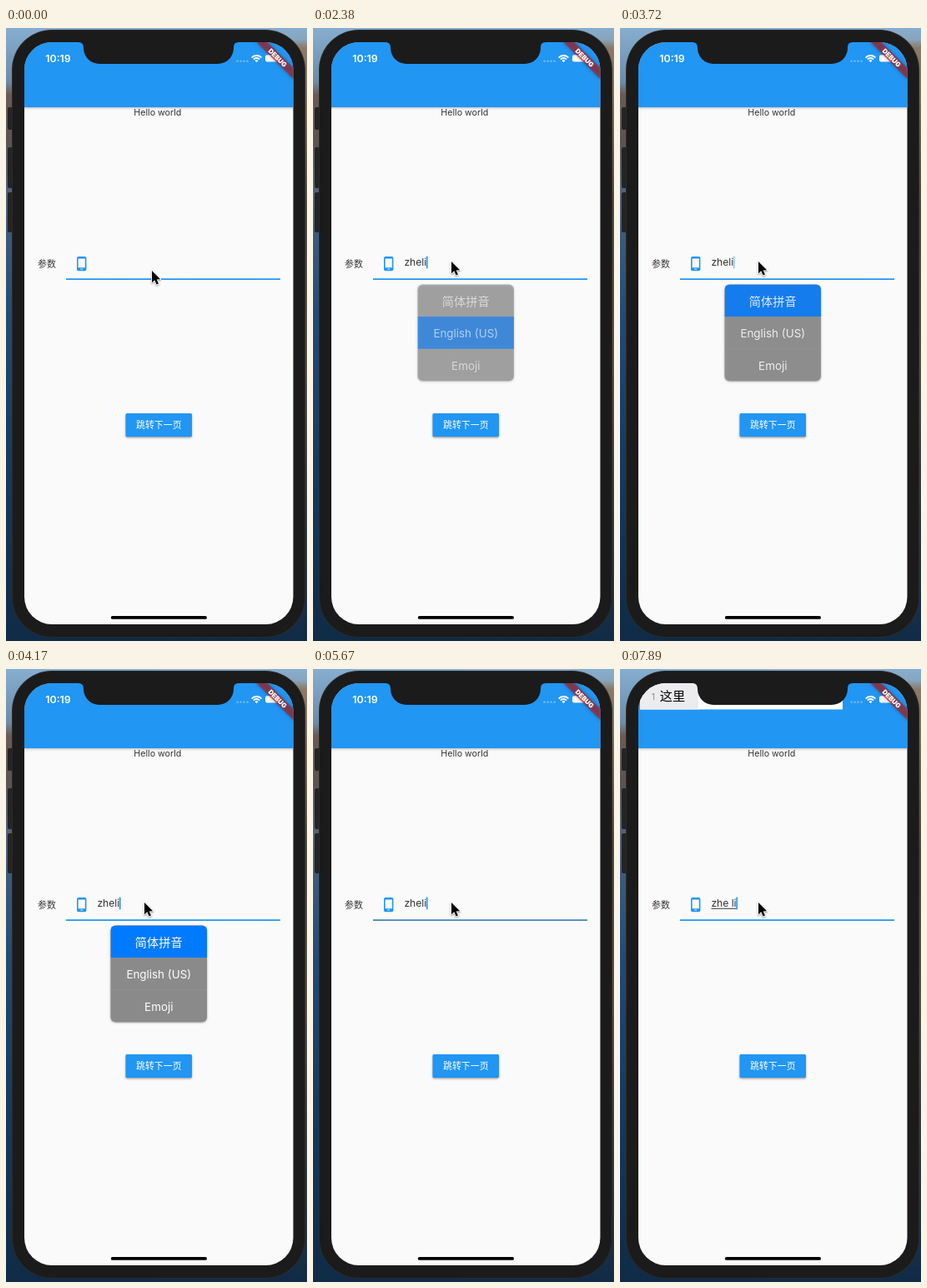
Recreate the animation shown at these times as an HTML page with a canvas. Size 361 px wide and 735 px high, loop 8000 ms.

```html
<!DOCTYPE html>
<html lang="zh-CN">
<head>
<meta charset="utf-8">
<title>Text field demo</title>
<style>
  html, body { margin: 0; width: 100%; height: 100%; overflow: hidden; background: #12304f; }
  canvas { display: block; width: 361px; height: 735px; }
</style>
</head>
<body>
<canvas id="stage"></canvas>
<script>
const W = 361, H = 735, LOOP = 8000;
const BLUE = '#2196f3', INK = '#333333';
const LATIN = 'Inter, "Noto Sans CJK SC", sans-serif';
const HAN = '"Noto Sans CJK SC", "Noto Sans CJK", sans-serif';

const canvas = document.getElementById('stage');
const ctx = canvas.getContext('2d');
const dpr = window.devicePixelRatio || 1;
canvas.width = W * dpr;
canvas.height = H * dpr;

// Each entry changes some of the state from its time (ms) on.
const START = {
  text: '', caret: 0, mx: 175, my: 291, line: BLUE,
  pick: 1, menu: 0, bar: '', composing: false
};
const STEPS = [
  [150, { mx: 169, my: 284, caret: 0.5 }],
  [300, { mx: 166, my: 280, caret: 1 }],
  [600, { caret: 0.5 }],
  [740, { caret: 0 }],
  [1040, { caret: 0.3 }],
  [1190, { caret: 0.7 }],
  [1340, { caret: 1 }],
  [1640, { caret: 0.5 }],
  [1790, { caret: 0 }],
  [2080, { text: 'zh', caret: 1 }],
  [2230, { text: 'zhel' }],
  [2380, { text: 'zheli', menu: 0.6 }],
  [2530, { menu: 1 }],
  [3280, { caret: 0.4 }],
  [3430, { caret: 0, menu: 0.86 }],
  [3580, { menu: 0.6 }],
  [3720, { pick: 0, menu: 0.85, caret: 0.5 }],
  [3870, { menu: 1, caret: 1 }],
  [4320, { menu: 0.4, line: '#3a8ed6' }],
  [4470, { menu: 0, line: '#4585bd' }],
  [5820, { line: BLUE }],
  [5970, { text: 'zhel' }],
  [6110, { text: 'zhe' }],
  [6260, { text: 'zh' }],
  [6410, { text: 'z' }],
  [6550, { text: '' }],
  [6850, { text: 'z', bar: '在', composing: true }],
  [7000, { text: 'zh', bar: '这' }],
  [7590, { text: 'zhe' }],
  [7740, { text: 'zhe l', bar: '这里' }],
  [7890, { text: 'zhe li' }]
];

function stateAt(t) {
  const s = { ...START };
  for (const [time, change] of STEPS) if (t >= time) Object.assign(s, change);
  return s;
}

function box(x, y, w, h, color, r = 0) {
  ctx.fillStyle = color;
  ctx.beginPath();
  ctx.roundRect(x, y, w, h, r);
  ctx.fill();
}

function shadow(color, blur, dy) {
  ctx.shadowColor = color;
  ctx.shadowBlur = blur * dpr;
  ctx.shadowOffsetY = dy * dpr;
}

function label(text, x, y, font, color, align = 'left') {
  ctx.font = font;
  ctx.fillStyle = color;
  ctx.textAlign = align;
  ctx.textBaseline = 'alphabetic';
  ctx.fillText(text, x, y);
}

function vertical(x, w, stops) {
  const g = ctx.createLinearGradient(0, 0, 0, H);
  for (const [y, c] of stops) g.addColorStop(y / H, c);
  ctx.fillStyle = g;
  ctx.fillRect(x, 0, w, H);
}

function drawDesktop() {
  vertical(0, 180, [[0, '#86aed0'], [65, '#6c8ba8'], [80, '#6a5b53'], [135, '#5c5350'],
    [190, '#566273'], [250, '#3b5a7c'], [350, '#224a74'], [520, '#163a60'], [735, '#0f2b47']]);
  vertical(180, 181, [[0, '#86aed0'], [14, '#88a4bc'], [24, '#8b7a69'], [110, '#75624f'],
    [220, '#4f4339'], [400, '#5a4c42'], [560, '#34383f'], [735, '#102b47']]);
}

function drawBody() {
  for (const [y, h] of [[95, 27], [143, 49], [197, 48]]) box(2, y, 8, h, '#242424', 2);
  box(7, 2, 352, 729, '#2b2b2b', 48);
  box(8, 3, 350, 727, '#1b1b1b', 47);
}

function drawNotch() {
  ctx.fillStyle = '#1b1b1b';
  ctx.beginPath();
  ctx.moveTo(87, 16);
  ctx.lineTo(279, 16);
  ctx.lineTo(279, 17);
  ctx.quadraticCurveTo(273, 17, 273, 23);
  ctx.arcTo(273, 43, 253, 43, 19);
  ctx.lineTo(112, 43);
  ctx.arcTo(93, 43, 93, 24, 19);
  ctx.quadraticCurveTo(93, 17, 87, 17);
  ctx.fill();
}

function drawStatus() {
  label('10:19', 62.5, 41, '600 12.4px ' + LATIN, '#fff', 'center');
  for (let i = 0; i < 4; i++) box(276.3 + i * 4, 38.5, 2.6, 2.6, 'rgba(255,255,255,.35)', 1.3);
  ctx.strokeStyle = '#fff';
  ctx.lineWidth = 1.8;
  for (const r of [8, 5]) {
    ctx.beginPath();
    ctx.arc(300.5, 41, r, -Math.PI * 0.76, -Math.PI * 0.24);
    ctx.stroke();
  }
  ctx.fillStyle = '#fff';
  ctx.beginPath();
  ctx.moveTo(300.5, 41.3);
  ctx.arc(300.5, 41, 2.8, -Math.PI * 0.76, -Math.PI * 0.24);
  ctx.fill();
  box(311, 32.2, 17, 8.4, '#fff', 2.4);
  box(328.8, 35, 1.2, 3, 'rgba(255,255,255,.5)', 0.6);
}

function drawBanner() {
  ctx.save();
  ctx.translate(344.5, 17);
  ctx.rotate(Math.PI / 4);
  ctx.save();
  shadow('rgba(0,0,0,.5)', 4.7, 0);
  box(-31.1, 21.8, 62.2, 9.4, 'rgba(183,28,28,.63)');
  ctx.restore();
  label('DEBUG', 0, 29.4, '900 7.9px ' + LATIN, '#fff', 'center');
  ctx.restore();
}

function drawCandidates(word) {
  box(24, 17, 243, 31.5, '#fdfdfd');
  box(24, 17, 70, 31.5, '#ececee');
  const left = 58 - (10 + word.length * 15.2) / 2;
  label('1', left, 36.5, '10.5px ' + LATIN, '#8e8e93');
  label(word, left + 10, 37.5, '15.2px ' + HAN, '#000');
}

function drawPhoneIcon() {
  box(85, 274, 11.4, 17.2, BLUE, 2);
  box(86.6, 276.4, 8.2, 10.8, '#fafafa');
  box(89.2, 288.6, 3, 1, '#fafafa', 0.4);
}

function drawField(s) {
  label('参数', 38, 287, '10.9px ' + HAN, INK);
  drawPhoneIcon();
  box(72, 300.3, 257, 1.6, s.line);
  const x = 109.4;
  label(s.text, x, 285, '12.1px ' + LATIN, INK);
  const w = ctx.measureText(s.text).width;
  if (s.composing) box(x, 286.8, w, 0.9, INK);
  if (s.caret) {
    ctx.globalAlpha = s.caret;
    box(x + w - 0.2, 273.4, 1.6, 15.2, BLUE, 0.8);
    ctx.globalAlpha = 1;
  }
}

function drawMenu(s) {
  if (!s.menu) return;
  const x = 125.5, y = 307.5, w = 115.5, row = 38.6;
  ctx.save();
  ctx.globalAlpha = s.menu;
  ctx.save();
  shadow('rgba(0,0,0,.4)', 2.5, 0.8);
  box(x, y, w, row * 3, '#8a8a8a', 6);
  ctx.restore();
  ctx.beginPath();
  ctx.roundRect(x, y, w, row * 3, 6);
  ctx.clip();
  if (s.pick === 0) box(x, y + row * 2, w, 0.6, '#989898');
  box(x, y + row * s.pick, w, row, '#007aff');
  ctx.globalAlpha = 1;
  const mid = x + w / 2;
  label('简体拼音', mid, 332.7, '14.2px ' + HAN, `rgba(255,255,255,${s.menu})`, 'center');
  label('English (US)', mid, 371.4, '13.4px ' + LATIN, `rgba(255,255,255,${s.menu})`, 'center');
  label('Emoji', mid, 410, '13.4px ' + LATIN, `rgba(255,255,255,${s.menu})`, 'center');
  ctx.restore();
}

function drawButton() {
  ctx.save();
  shadow('rgba(0,0,0,.4)', 2.4, 1.2);
  box(143.5, 462, 79.5, 28, BLUE, 1.6);
  ctx.restore();
  label('跳转下一页', 183.3, 480, '500 10.9px ' + HAN, '#fff', 'center');
}

function drawMouse(x, y) {
  ctx.save();
  ctx.translate(x, y);
  ctx.beginPath();
  const outline = [[0, 0], [0, 14.2], [3.3, 11.2], [5.6, 16.6], [8, 15.6], [5.7, 10.4], [10.2, 10.2]];
  for (const [px, py] of outline) ctx.lineTo(px, py);
  ctx.closePath();
  ctx.lineJoin = 'round';
  ctx.lineWidth = 1.8;
  ctx.strokeStyle = '#fff';
  shadow('rgba(0,0,0,.4)', 2, 1);
  ctx.stroke();
  shadow('transparent', 0, 0);
  ctx.fillStyle = '#000';
  ctx.fill();
  ctx.restore();
}

function drawScreen(s) {
  ctx.save();
  ctx.beginPath();
  ctx.roundRect(22, 17, 322.5, 698, 33);
  ctx.clip();
  box(22, 17, 323, 698, '#fafafa');
  ctx.save();
  shadow('rgba(0,0,0,.38)', 3.5, 1.2);
  box(18, 10, 331, 85, BLUE);
  ctx.restore();
  label('Hello world', 181.8, 105, '10.7px ' + LATIN, INK, 'center');
  drawStatus();
  drawBanner();
  if (s.bar) drawCandidates(s.bar);
  drawField(s);
  drawMenu(s);
  drawButton();
  box(125.8, 705, 115.2, 3.8, '#000', 1.9);
  ctx.restore();
}

function frame(now) {
  const s = stateAt(now % LOOP);
  ctx.setTransform(dpr, 0, 0, dpr, 0, 0);
  drawDesktop();
  drawBody();
  drawScreen(s);
  drawNotch();
  drawMouse(s.mx, s.my);
  requestAnimationFrame(() => frame(performance.now() - begin));
}

const begin = performance.now();
frame(0);
</script>
</body>
</html>
```
